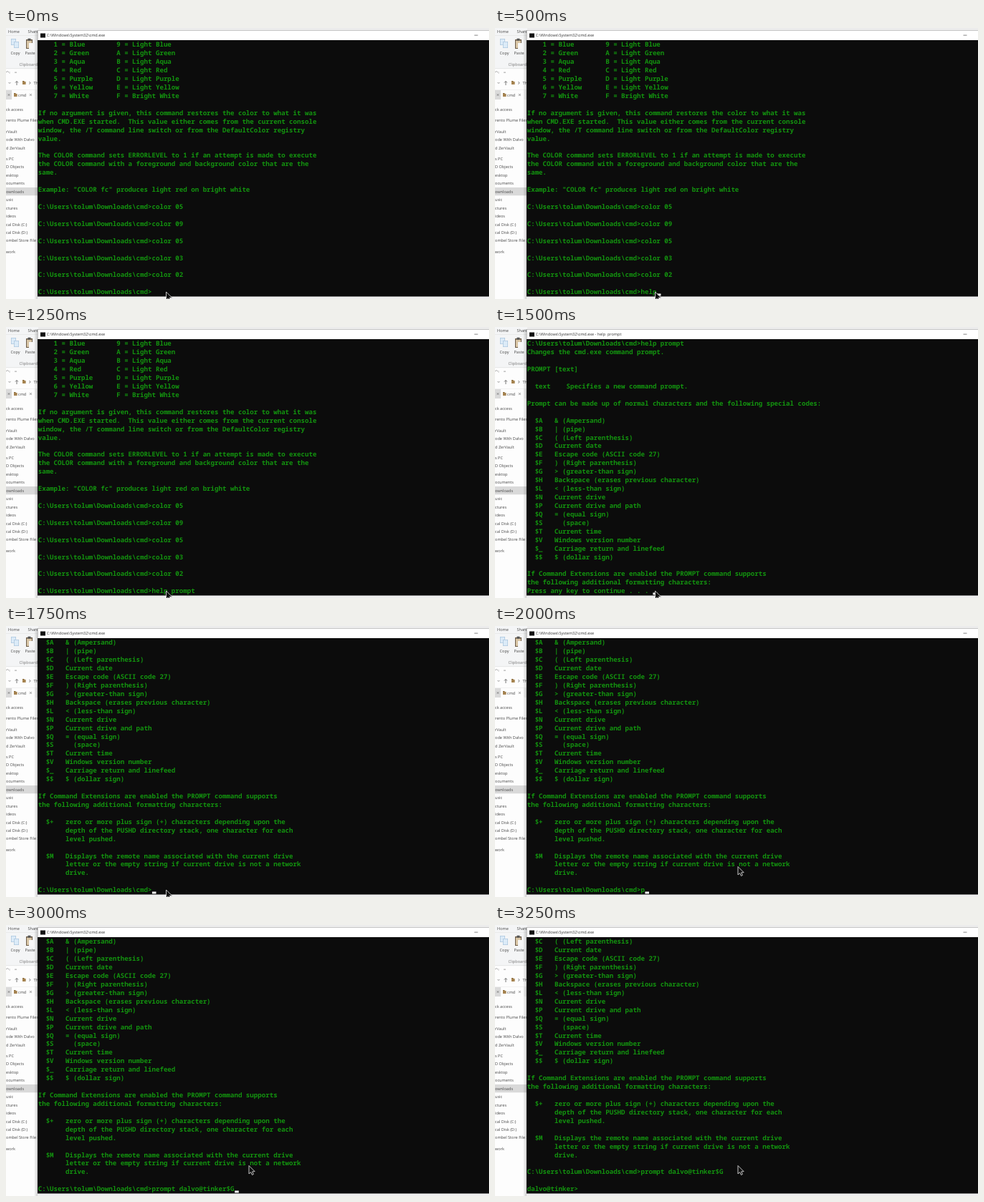
Recreate the animation shown at these times as an HTML page with a canvas. Size 674 px wide and 379 px high, loop 3.5 s.

```html
<!DOCTYPE html>
<html lang="en">
<head>
<meta charset="utf-8">
<title>Command prompt</title>
<style>
  html, body { margin: 0; width: 100%; height: 100%; overflow: hidden; background: #fff; }
  canvas { display: block; }
</style>
</head>
<body>
<canvas id="stage" width="674" height="379"></canvas>
<script>
const ctx = document.getElementById('stage').getContext('2d');
const W = 674, H = 379, STEP = 250, LOOP = 3500;
const ROWS = 30, LEFT = 44.7, TOP = 17, PITCH = 11.93, ADVANCE = 5.49;
const MONO = '600 9.15px "Noto Sans Mono", "DejaVu Sans Mono", monospace';
const UI = '"Open Sans", "Noto Sans", sans-serif';
const PROMPT = 'C:\\Users\\tolum\\Downloads\\cmd>';
const USER = 'dalvo@tinker';
const COMMAND = `prompt ${USER}$G`;

const COLORS = [
  ['1 = Blue', '9 = Light Blue'], ['2 = Green', 'A = Light Green'],
  ['3 = Aqua', 'B = Light Aqua'], ['4 = Red', 'C = Light Red'],
  ['5 = Purple', 'D = Light Purple'], ['6 = Yellow', 'E = Light Yellow'],
  ['7 = White', 'F = Bright White']
].map(([a, b]) => '    ' + a.padEnd(16) + b);

const COLOR_HELP = [...COLORS, ...`
If no argument is given, this command restores the color to what it was
when CMD.EXE started.  This value either comes from the current console
window, the /T command line switch or from the DefaultColor registry
value.

The COLOR command sets ERRORLEVEL to 1 if an attempt is made to execute
the COLOR command with a foreground and background color that are the
same.

Example: "COLOR fc" produces light red on bright white
`.split('\n'),
...['05', '09', '05', '03', '02'].flatMap(c => [PROMPT + 'color ' + c, ''])];

const PROMPT_HELP = (PROMPT + `help prompt
Changes the cmd.exe command prompt.

PROMPT [text]

  text    Specifies a new command prompt.

Prompt can be made up of normal characters and the following special codes:

  $A   & (Ampersand)
  $B   | (pipe)
  $C   ( (Left parenthesis)
  $D   Current date
  $E   Escape code (ASCII code 27)
  $F   ) (Right parenthesis)
  $G   > (greater-than sign)
  $H   Backspace (erases previous character)
  $L   < (less-than sign)
  $N   Current drive
  $P   Current drive and path
  $Q   = (equal sign)
  $S     (space)
  $T   Current time
  $V   Windows version number
  $_   Carriage return and linefeed
  $$   $ (dollar sign)

If Command Extensions are enabled the PROMPT command supports
the following additional formatting characters:`).split('\n');

const MORE_HELP = [...PROMPT_HELP, ...`
  $+   zero or more plus sign (+) characters depending upon the
       depth of the PUSHD directory stack, one character for each
       level pushed.

  $M   Displays the remote name associated with the current drive
       letter or the empty string if current drive is not a network
       drive.
`.split('\n')];

const typing = (log, command, count, caret = true) =>
  ({ lines: [...log, PROMPT + command.slice(0, count)], caret });

// One console state per quarter second.
const STATES = [
  typing(COLOR_HELP, '', 0, false),
  ...[0, 4, 7, 10].map(n => typing(COLOR_HELP, 'help prompt', n)),
  typing(COLOR_HELP, 'help prompt', 11, false),
  { lines: [...PROMPT_HELP, 'Press any key to continue . . . '], caret: true, title: ' - help  prompt' },
  ...[0, 1, 9, 14, 19, 21].map(n => typing(MORE_HELP, COMMAND, n)),
  { lines: [...MORE_HELP, PROMPT + COMMAND, '', USER + '>'], caret: false }
];

const SIDEBAR = [
  ['ck access', 114], ['rento Plume Files', 129], ['rVault', 144.5],
  ['ode With Dalvo', 156], ['d ZerVault', 167.5], ['s PC', 183],
  ['D Objects', 194.3], ['esktop', 205.8], ['ocuments', 217.2],
  ['ownloads', 228.7], ['usic', 240.2], ['ctures', 251.7], ['ideos', 263.1],
  ['cal Disk (C:)', 274.5], ['cal Disk (D:)', 286], ['ombel Store File S', 297.4],
  ['work', 312.8]
];

function box(x, y, w, h, fill) {
  ctx.fillStyle = fill;
  ctx.fillRect(x, y, w, h);
}

function label(text, x, y, fill = '#4a4a4a', size = 5.6) {
  ctx.font = `${size}px ${UI}`;
  ctx.fillStyle = fill;
  ctx.fillText(text, x, y + size * 0.36);
}

function stroke(points, color, width = 0.8) {
  ctx.beginPath();
  points.forEach(([x, y]) => ctx.lineTo(x, y));
  ctx.strokeStyle = color;
  ctx.lineWidth = width;
  ctx.stroke();
}

function cross(x, y, r) {
  stroke([[x - r, y - r], [x + r, y + r]], '#666', 0.7);
  stroke([[x - r, y + r], [x + r, y - r]], '#666', 0.7);
}

function folder(x, y) {
  box(x, y, 2.6, 2, '#8a6a3a');
  box(x, y + 1, 4.6, 4, '#a58350');
}

function page(x, y) {
  box(x, y, 7, 9, '#a9c4dc');
  box(x + 0.7, y + 0.7, 5.6, 7.6, '#dcebf8');
}

function drawExplorer() {
  box(0, 0, 45, H, '#fdfdfd');
  box(0, 0, 45, 57, '#f4f5f6');
  label('Home', 3, 5);
  label('Share', 30.5, 5);
  box(0, 10, 45, 0.6, '#e3e3e3');

  page(7, 15);
  page(11, 19);
  box(28, 16, 9, 13, '#6b5b48');
  box(29, 17.5, 7, 10.5, '#d8c5a5');
  box(30.5, 14.7, 4, 3, '#555');
  box(32, 21, 6, 8.5, '#f7f7f7');
  label('Copy', 6.5, 34.5);
  label('Paste', 26.5, 34.5);
  label('Clipboard', 18.5, 51, '#777');
  box(0, 56.5, 45, 0.6, '#dcdcdc');

  stroke([[0, 62], [2, 60.5], [4, 62]], '#999');
  stroke([[5, 61], [5, 64]], '#bbb');
  box(12, 61.7, 3, 0.8, '#888');
  stroke([[3.5, 76], [5, 77.5], [6.5, 76]], '#777');
  stroke([[15, 80], [15, 74.5]], '#555');
  stroke([[13, 76.5], [15, 74.5], [17, 76.5]], '#555');
  folder(23, 74);
  stroke([[32.5, 75], [34, 76.8], [32.5, 78.6]], '#555');
  label('Th', 38.5, 77);

  box(0, 86, 45, 14, '#f1f1f1');
  box(0, 87, 8, 13, '#dadada');
  box(8.5, 87, 32, 13, '#fdfdfd');
  cross(4, 93.5, 1.3);
  folder(11, 91);
  label('cmd', 17, 93.5);
  cross(34.5, 93.5, 1.4);

  box(0, 223, 45, 11.3, '#d9d9d9');
  SIDEBAR.forEach(([text, y]) => label(text, 0, y));
}

function drawWindow(suffix = '') {
  const shade = ctx.createLinearGradient(39, 0, 45, 0);
  shade.addColorStop(0, 'rgba(0,0,0,0)');
  shade.addColorStop(1, 'rgba(0,0,0,.22)');
  box(39, 3, 6, H - 3, shade);
  box(45, 0, W - 45, 3, '#ececec');
  box(44, 3, W - 44, 14, '#a0a0a0');
  box(44.6, 3.6, W - 44, 13.4, '#fff');
  box(48, 7.5, 7, 6, '#111');
  label('C:\\Windows\\System32\\cmd.exe' + suffix, 56.8, 10.3, '#333', 5.55);
  box(653.5, 9.7, 5, 0.8, '#666');
  box(44, 17, W - 44, 358, '#0c0c0c');
  box(44, 375, W - 44, 1, '#777');
  box(44, 376, W - 44, 3, '#eee');
}

function drawConsole({ lines, caret }) {
  ctx.font = MONO;
  ctx.fillStyle = '#13930f';
  lines.slice(-ROWS).forEach((line, row) => {
    ctx.fillText(line, LEFT, TOP + row * PITCH + 9.3);
  });
  if (caret) box(LEFT + lines.at(-1).length * ADVANCE, 371.5, 5.6, 3, '#f2f2f2');
}

function drawPointer(x, y) {
  ctx.beginPath();
  [[0, 0], [0, 11.5], [2.6, 9.2], [4.5, 13], [6.4, 12.1], [4.7, 8.4], [8.2, 8.2]]
    .forEach(([dx, dy]) => ctx.lineTo(x + dx, y + dy));
  ctx.closePath();
  ctx.fillStyle = '#111';
  ctx.fill();
  ctx.strokeStyle = '#d8d8d8';
  ctx.lineWidth = 0.9;
  ctx.stroke();
}

function draw(now) {
  const time = now % LOOP;
  const state = STATES[Math.floor(time / STEP)];
  ctx.textRendering = 'geometricPrecision';
  drawExplorer();
  drawWindow(state.title);
  drawConsole(state);
  if (time < 2000) drawPointer(223.5, 369);
  else drawPointer(339, 336.5);
  requestAnimationFrame(frame);
}

const start = performance.now();
function frame() {
  draw(performance.now() - start);
}
frame();
</script>
</body>
</html>
```
